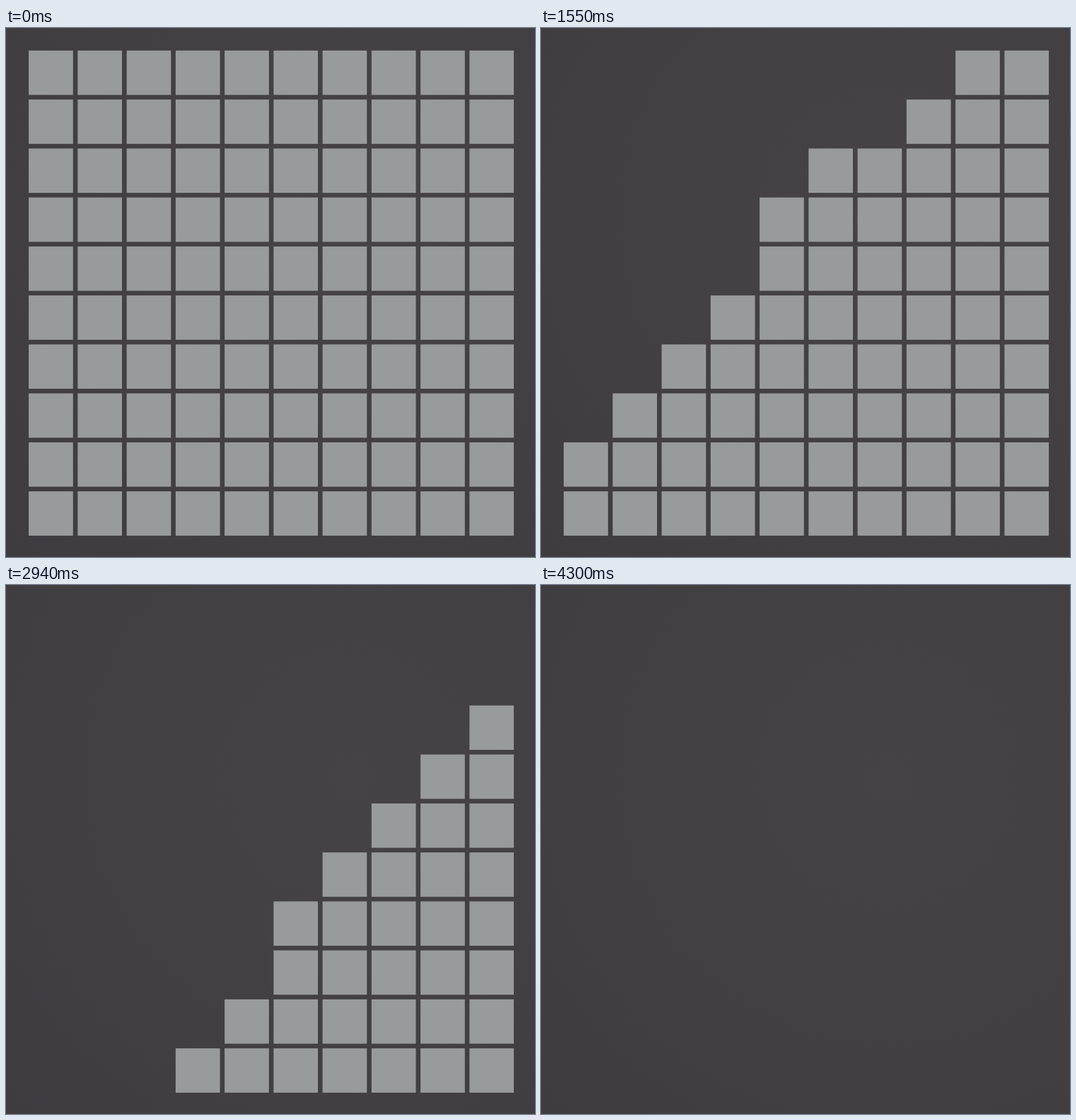
Animation of 748x748 px, one loop 4.42 s. Source, as an HTML page with a canvas:

```html
<!DOCTYPE html>
<html>
<head>
<meta charset="utf-8">
<style>
  html, body { margin: 0; width: 100%; height: 100%; overflow: hidden; background: #424042; }
  canvas { display: block; }
</style>
</head>
<body>
<canvas width="748" height="748"></canvas>
<script>
const ctx = document.querySelector('canvas').getContext('2d');
const LOOP = 4420, DELAY = 118, RATE = 24 / 1000;
const LEFT = 32.1, TOP = 31.9, PITCH = 69.25, SIZE = 62.7;

// Diagonals leave one after another; within one, the lower cells lead.
function rank({ row, col }) {
  const diagonal = row + col;
  const place = diagonal < 13
    ? (row >= diagonal / 2 ? -row : row)
    : (row >= 7 ? row - 20 : -row);
  return diagonal * 100 + place;
}

const cells = Array.from({ length: 100 }, (_, i) => ({ row: Math.floor(i / 10), col: i % 10 }))
  .sort((a, b) => rank(a) - rank(b));

const backdrop = ctx.createRadialGradient(490, 270, 0, 490, 270, 690);
backdrop.addColorStop(0, '#454345');
backdrop.addColorStop(0.5, '#424042');
backdrop.addColorStop(1, '#3e3c3f');

function draw(time) {
  // One cell vanishes at each beat, 24 beats a second.
  const gone = Math.max(0, Math.floor((time - DELAY) * RATE));
  ctx.fillStyle = backdrop;
  ctx.fillRect(0, 0, 748, 748);
  ctx.fillStyle = '#999a9c';
  for (const { row, col } of cells.slice(gone)) {
    ctx.fillRect(LEFT + col * PITCH, TOP + row * PITCH, SIZE, SIZE);
  }
}

function tick() {
  draw(performance.now() % LOOP);
  requestAnimationFrame(tick);
}
tick();
</script>
</body>
</html>
```
